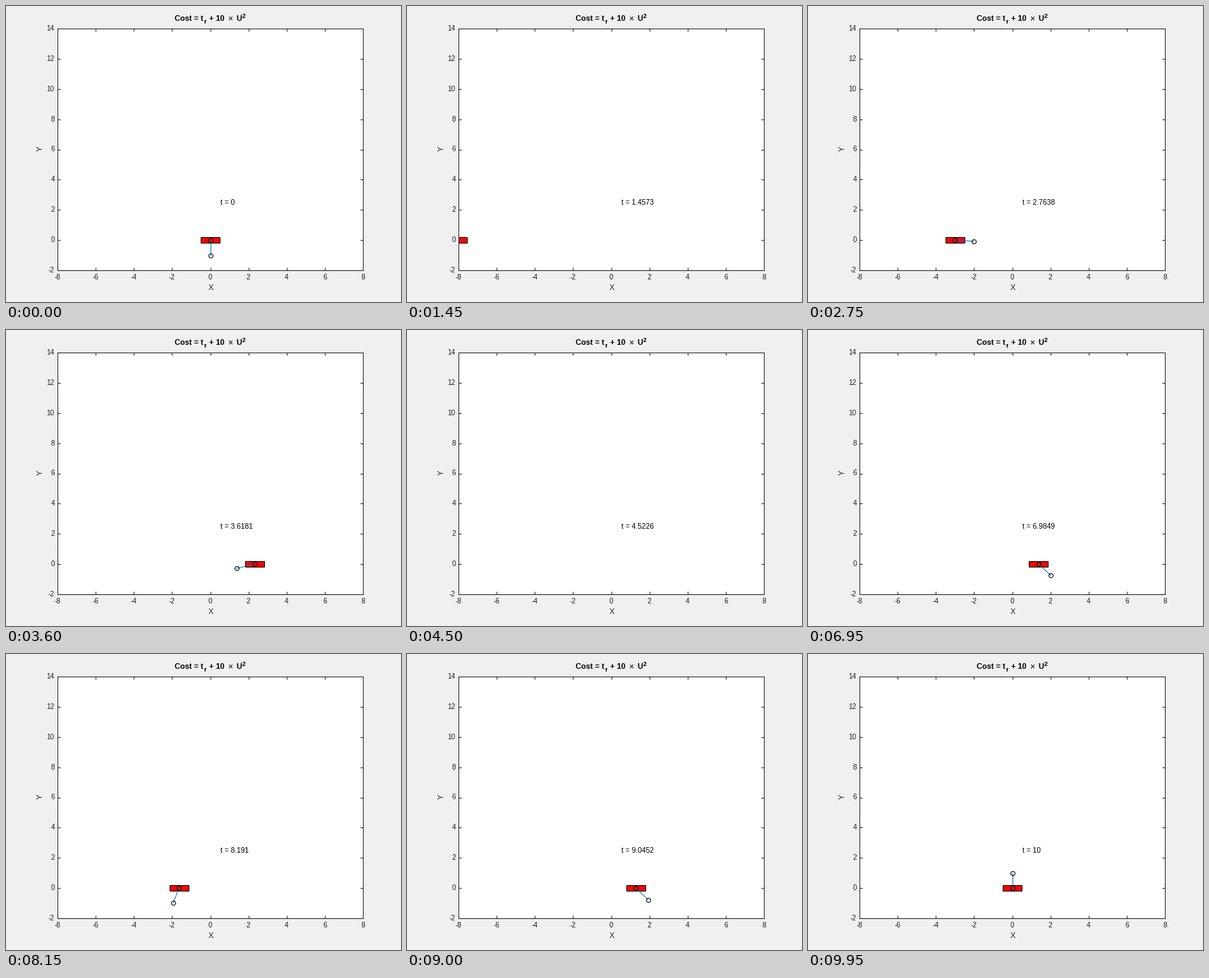
A matplotlib script that plays this animation: 560x420 px, repeating every 10000 ms.

```python
import numpy as np
import matplotlib.pyplot as plt
from matplotlib.animation import FuncAnimation
from matplotlib.patches import Rectangle

W, H, DPI = 560, 420, 100
PX = 72 / DPI  # points per pixel
LEFT, RIGHT, TOP, BOTTOM = 73, 506, 32, 375  # axes box in pixels from top left
FRAMES, DURATION = 200, 10.0
GREY = "0.15"

plt.rcParams["font.family"] = "Liberation Sans"

# Key places of the cart (time, x)
CART = [(0, 0), (1.055, -6.15), (1.457, -8.07), (2.11, -7.4), (2.764, -3.0),
        (4.22, 6.18), (4.85, 10.6), (5.779, 6.92), (7.387, -0.03),
        (8.191, -1.63), (9.3, 1.68), (10, 0)]
# Turning points of the pole (time, degrees from hanging down)
SWINGS = [(0, 0), (0.6, 82), (1.62, -85), (2.65, 94), (3.5, -82), (4.4, 110),
          (5.7, -109), (6.65, 80), (7.7, -82), (8.8, 72), (9.9, -180)]


def glide(keys, t, pause=False):
    """Cubic Hermite curve, at rest at both ends or, with pause, at every key."""
    kt, kv = np.array(keys, float).T
    slope = np.zeros_like(kv) if pause else np.gradient(kv, kt)
    slope[0] = slope[-1] = 0
    t = np.clip(t, kt[0], kt[-1])
    i = np.clip(np.searchsorted(kt, t, side="right") - 1, 0, len(kt) - 2)
    h = kt[i + 1] - kt[i]
    s = (t - kt[i]) / h
    ease = s * s * (3 - 2 * s)
    return (kv[i] + (kv[i + 1] - kv[i]) * ease
            + h * s * (1 - s) * ((1 - s) * slope[i] - s * slope[i + 1]))


times = np.linspace(0, DURATION, FRAMES)
cart_x = glide(CART, times)
theta = np.radians(glide(SWINGS, times, pause=True))

fig = plt.figure(figsize=(W / DPI, H / DPI), dpi=DPI, facecolor="0.94")
ax = fig.add_axes([LEFT / W, 1 - BOTTOM / H,
                   (RIGHT - LEFT) / W, (BOTTOM - TOP) / H])
ax.set(xlim=(-8, 8), ylim=(-2, 14),
       xticks=range(-8, 9, 2), yticks=range(-2, 15, 2))
ax.tick_params(direction="in", top=True, right=True, length=4.4 * PX,
               width=PX, color=GREY, labelbottom=False, labelleft=False)
for spine in ax.spines.values():
    spine.set(linewidth=PX, color=GREY)


def label(x, y, text, size=10, color=GREY, **kw):
    """Text at a pixel position measured from the top left."""
    kw = {"ha": "left", "va": "baseline", **kw}
    return fig.text(x / W, 1 - y / H, text, fontsize=size * PX,
                    color=color, **kw)


for k in range(9):
    label(LEFT + (RIGHT - LEFT) * k / 8, 388, str(2 * k - 8), ha="center")
    label(69, BOTTOM + 3 - (BOTTOM - TOP) * k / 8, str(2 * k - 2), ha="right")
label(290, 403, "X", 11, ha="center")
label(48.5, 202.5, "Y", 11, ha="center", va="center", rotation=90)

bold = dict(color="black", weight="bold")
label(239, 21, "Cost = t", 11, **bold)
label(281, 25, "f", 8.5, **bold)
label(287.5, 21, "+ 10", 11, **bold)
label(318, 21, "\u00d7", 12, "black", ha="center")
label(326.3, 21, "U", 11, **bold)
label(335.2, 17, "2", 8.8, **bold)

clock = label(303.6, 282, "", 10.3, "black")
cart = ax.add_patch(Rectangle((0, -0.2), 1, 0.4, fc="red", ec="black",
                              lw=PX, zorder=2))
rod, = ax.plot([], [], color=(0, 0.447, 0.741), lw=PX, zorder=2.1)
# Joints are never cut at the border; they vanish once their centre leaves
joints, = ax.plot([], [], "o", ms=6 * PX, mfc="none", mec="black",
                  mew=PX, clip_on=False, zorder=2.2)


def draw(i):
    x = cart_x[i]
    px = np.array([x, x + np.sin(theta[i])])
    py = np.array([0, -np.cos(theta[i])])
    cart.set_x(x - 0.5)
    rod.set_data(px, py)
    inside = np.abs(px) <= 8
    joints.set_data(px[inside], py[inside])
    clock.set_text(f"t = {times[i]:.5g}")
    return cart, rod, joints, clock


anim = FuncAnimation(fig, draw, frames=FRAMES, interval=50,
                     repeat=True, repeat_delay=0)
plt.show()
```
